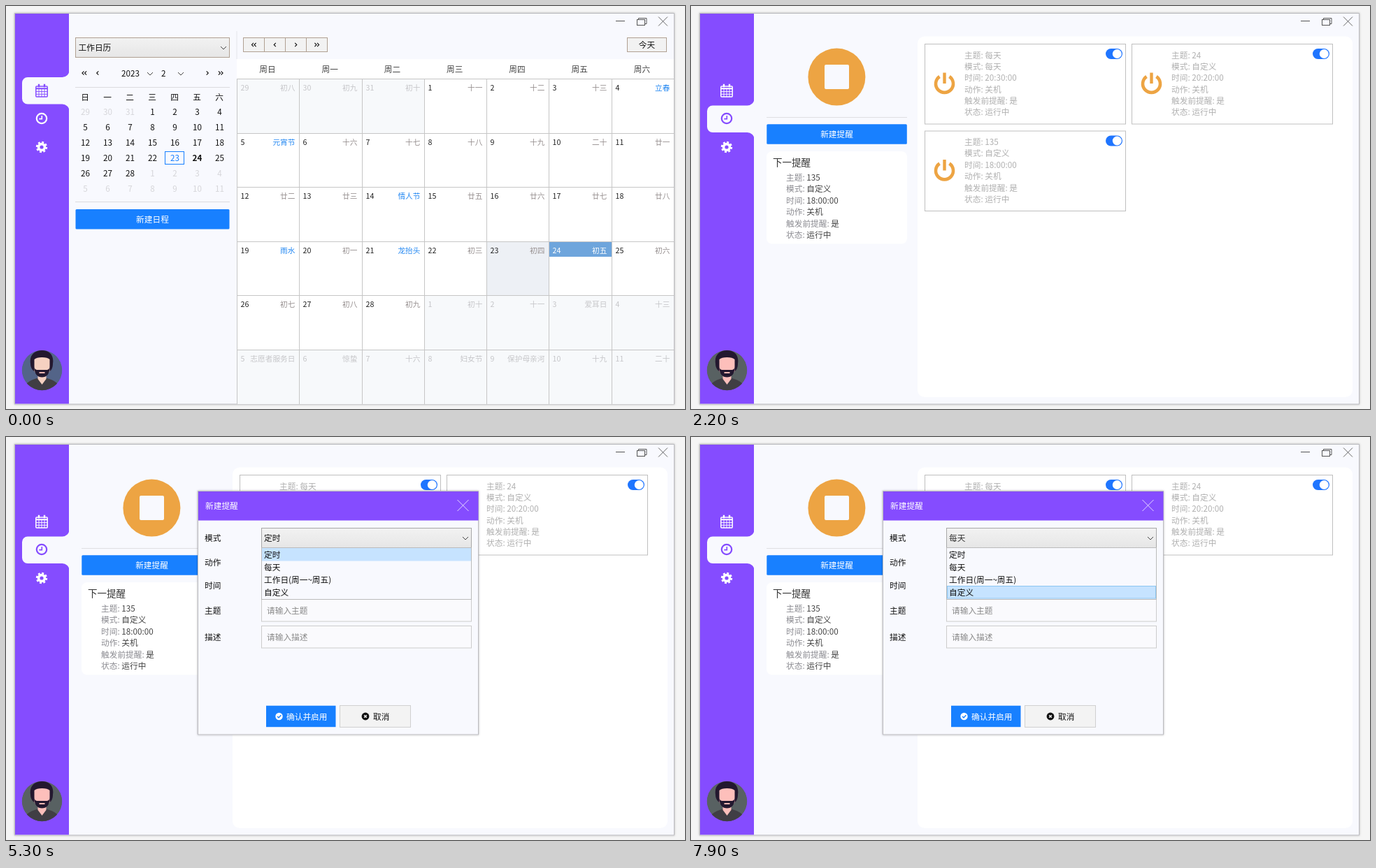
These frames come from a looping animation (971 px wide and 577 px high, 8 s). An HTML page:

```html
<!DOCTYPE html>
<html lang="zh-CN">
<head>
<meta charset="utf-8">
<title>日程与提醒</title>
<style>
html, body { margin: 0; width: 100%; height: 100%; overflow: hidden; background: #f5f5f5; }
svg { display: block; width: 971px; height: 577px; }
text { font-family: "Noto Sans CJK SC", "Noto Sans CJK", "Noto Sans", sans-serif; white-space: pre; }

/* Hard cuts on one shared 8 s clock */
.cut { animation: 8s step-end infinite; }
#calendar { animation-name: leave; }
#reminders { animation-name: enter; }
#dialog { animation-name: dialog; }
#timed { animation-name: timed; }
#daily { animation-name: daily; }
#popup { animation-name: popup; }
#hover { animation-name: hover; }
#close { animation-name: close; }
#back { animation-name: back; }
#skin { animation-name: skin; }

@keyframes leave { 0% { visibility: visible } 7.5%, 100% { visibility: hidden } }
@keyframes enter { 0% { visibility: hidden } 7.5%, 100% { visibility: visible } }
@keyframes dialog { 0% { visibility: hidden } 45%, 100% { visibility: visible } }
@keyframes timed { 0% { visibility: hidden } 45% { visibility: visible } 80%, 100% { visibility: hidden } }
@keyframes daily { 0% { visibility: hidden } 80%, 100% { visibility: visible } }
@keyframes popup {
  0% { visibility: hidden } 62.5% { visibility: visible }
  80% { visibility: hidden } 88.75%, 100% { visibility: visible }
}
@keyframes hover {
  0% { transform: none; stroke: #c6e3ff }
  75% { transform: translateY(18px); stroke: #8cc6f2 }
  93.75% { transform: translateY(36px); stroke: #8cc6f2 }
  97.5%, 100% { transform: translateY(54px); stroke: #8cc6f2 }
}
@keyframes close { 0% { opacity: .55 } 57.5%, 100% { opacity: .8 } }
@keyframes back { 0% { fill: #536488 } 7.5%, 100% { fill: #586162 } }
@keyframes skin { 0% { fill: #f6d1c1 } 7.5%, 100% { fill: #fdbfbb } }
</style>
</head>
<body>
<svg id="stage" viewBox="0 0 971 577"></svg>
<script>
const BG = '#f8f9fe', PURPLE = '#854cff', BLUE = '#1880ff', ORANGE = '#eda443';
const WEEK = [...'日一二三四五六'];

const rect = (x, y, w, h, fill, stroke = 'none', r = 0, more = '') =>
  `<rect x="${x}" y="${y}" width="${w}" height="${h}" rx="${r}" fill="${fill}" stroke="${stroke}" ${more}/>`;
const path = (d, stroke, width = 1, fill = 'none') =>
  `<path d="${d}" fill="${fill}" stroke="${stroke}" stroke-width="${width}"/>`;
const disc = (x, y, r, fill, more = '') => `<circle cx="${x}" cy="${y}" r="${r}" fill="${fill}" ${more}/>`;
const ring = (x, y, r, color, width, more = '') =>
  disc(x, y, r, 'none', `stroke="${color}" stroke-width="${width}" ${more}`);
// y is the vertical middle of the line
const text = (s, x, y, fill = '#111', anchor = 'start', size = 11.7, weight = 400) =>
  `<text x="${x}" y="${y + size * .37}" fill="${fill}" text-anchor="${anchor}" font-size="${size}" font-weight="${weight}">${s}</text>`;
const group = (id, body) => `<g id="${id}" class="cut">${body}</g>`;
const times = (n, f) => Array.from({ length: n }, (_, i) => f(i)).join('');

const down = (x, y, c = '#444') => path(`M${x - 4} ${y - 2}l4 4 4-4`, c);
const angle = (x, y, dir) => path(`M${x - 1.3 * dir} ${y - 2.6}l${2.6 * dir} 2.6 ${-2.6 * dir} 2.6`, '#111', 1.1);
const angles = (x, y, dir) => angle(x - 1.8, y, dir) + angle(x + 1.8, y, dir);
const cross = (x, y, r, c, w = 1) =>
  path(`M${x - r} ${y - r}l${2 * r} ${2 * r}M${x + r} ${y - r}l${-2 * r} ${2 * r}`, c, w);
const button = (x, y, w, h, s) => rect(x, y, w, h, BLUE, 'none', 1.5) + text(s, x + w / 2, y + h / 2, '#fff', 'middle');
const combo = (x, y, w, border = '#a8a8a8') =>
  rect(x, y, w, 28, 'url(#face)', border) + down(x + w - 8.5, y + 14.5);
const framed = (x, y, w, h) => `<g filter="url(#shadow)">${rect(x, y, w, h, BG, '#bcbcc0')}</g>`;

const calIcon = c => rect(42.8, 115, 16.4, 15, 'none', c, 1, 'stroke-width="1.5"')
  + path('M42.5 118.2h17', c, 2) + path('M43 122.5h16M43 126.3h16M47 119v11M51 119v11M55 119v11', c, .9)
  + path('M47 111.8v4.5M55 111.8v4.5', c, 2.4);
const clockIcon = c => ring(51, 161, 7.2, c, 2.2) + path('M51.3 157v4.6h-4', c, 1.6);
const gearIcon = ring(51, 202, 4.4, '#fff', 3.6) + ring(51, 202, 6.9, '#fff', 2.6, 'stroke-dasharray="2.9 2.52"');
const tab = y => path(`M90.5 ${y - 10}A10 10 0 0 1 80 ${y}H31a8 8 0 0 0-8 8v22.500a8 8 0 0 0 8 8h49A10 10 0 0 1 90.5 ${y + 48.5}z`, 'none', 0, BG);

function shell() {
  const hair = '#23182f';
  const avatar = `<g clip-path="url(#round)">`
    + disc(51.5, 521.5, 29, '#536488', 'id="back" class="cut"')
    + path('M24 552C25 541 34 536 44 533h15c10 3 19 8 20 19z', 'none', 0, '#403e44')
    + path('M35 512C33 500 41 493 51.500 493S69 500 67 512c0 6-2 9-4 11H40c-2-2-5-5-5-11z', 'none', 0, hair)
    + `<path id="skin" class="cut" d="M40.500 506q3-3 11-3t11 3v17l-5 6v5l-6 8-6-8v-5l-5-6z"/>`
    + path('M40 516C40.500 527 45 531.500 51.500 531.500S62.500 527 63 516C62 522 58 521 51.500 521S41 522 40 516z', 'none', 0, hair)
    + path('M47.500 525h8', '#f0b8b2', 1.8) + '</g>';
  return framed(12.5, 10.5, 943, 559.5)
    + rect(13, 11, 77, 558.5, PURPLE) + avatar + gearIcon
    + path('M872 21.5h13', '#555') + rect(902.5, 19.5, 11, 8, BG, '#555')
    + path('M904.500 19v-1.500h11.500v8h-2', '#555') + cross(939.5, 22, 6.5, '#666');
}

const lunar = ('初八 初九 初十 十一 十二 十三 立春 元宵节 十六 十七 十八 十九 二十 廿一 '
  + '廿二 廿三 情人节 廿五 廿六 廿七 廿八 雨水 初一 龙抬头 初三 初四 初五 初六 '
  + '初七 初八 初九 初十 十一 爱耳日 十三 志愿者服务日 惊蛰 十六 妇女节 保护母亲河 十九 二十').split(' ');
const FESTIVALS = ['立春', '元宵节', '情人节', '雨水', '龙抬头'];
const inMonth = i => i > 2 && i < 31;
const dayOf = i => i < 3 ? 29 + i : inMonth(i) ? i - 2 : i - 30;
const colX = i => Math.round(330.1 + i * 89.25);
const rowY = i => Math.round(104 + i * 77.6);

function miniDay(i) {
  const d = dayOf(i), x = 113 + i % 7 * 32, y = 152 + Math.floor(i / 7) * 22;
  const now = inMonth(i) && d === 23, next = inMonth(i) && d === 24;
  return (now ? rect(x - 13.5, y - 9.5, 27, 18, BG, BLUE) : '')
    + text(d, x + .5, y, now ? BLUE : inMonth(i) ? '#111' : '#d6d6da', 'middle', 11.7, next ? 700 : 400);
}

function cell(i) {
  const col = i % 7, row = Math.floor(i / 7), x = colX(col), y = rowY(row);
  const w = colX(col + 1) - x, h = rowY(row + 1) - y;
  const on = inMonth(i), d = dayOf(i), today = on && d === 24, name = lunar[i];
  const fill = !on ? '#f7f9fb' : d === 23 ? '#edf0f5' : '#fff';
  const color = today ? '#fff' : on ? '#222' : '#c6c6c9';
  const note = today || !on ? color : FESTIVALS.includes(name) ? '#2488f2' : '#968f8f';
  return rect(x, y, w, h, fill) + (today ? rect(x, y, w, 22, '#6ea5dc') : '')
    + text(d, x + 5.5, y + 13, color, 'start', 10.7) + text(name, x + 83.5, y + 13, note, 'end', 10.7);
}

function calendar() {
  const edge = '#b0a092';
  return tab(102) + calIcon(PURPLE) + clockIcon('#fff')
    + combo(99.5, 45.5, 220, edge) + text('工作日历', 103.5, 60)
    + angles(112, 96, -1) + angle(131, 96, -1) + text('2023', 165, 97) + down(206, 97)
    + text('2', 222, 97) + down(250, 97) + angle(288, 96, 1) + angles(307, 96, 1)
    + path('M99 116.5h221M99 280.500h221', '#dcdcdf')
    + times(7, i => text(WEEK[i], 113 + i * 32, 130.5, '#111', 'middle')) + times(42, miniDay)
    + button(99.5, 291, 220, 28.5, '新建日程')
    + path('M330 36v40', '#e4e4ea')
    + rect(339.5, 45.5, 120, 20, '#f2f2f2', edge) + path('M369.500 45v21M399.500 45v21M429.500 45v21', edge)
    + angles(354.5, 55.5, -1) + angle(384.5, 55.5, -1) + angle(414.5, 55.5, 1) + angles(444.5, 55.5, 1)
    + rect(888.5, 45.5, 56, 20, '#f2f2f2', edge) + text('今天', 916.5, 56, '#111', 'middle')
    + rect(330, 76, 625, 28, '#fff')
    + times(7, i => text('周' + WEEK[i], 374 + i * 89.25, 90.5, '#444', 'middle'))
    + times(42, cell)
    + times(6, i => path(`M330 ${rowY(i) + .5}h625`, '#c6c6c6'))
    + times(7, i => path(`M${colX(i) + .5} 104v466`, '#c6c6c6'));
}

const KEYS = ['主题', '模式', '时间', '动作', '触发前提醒', '状态'];
const details = (x, y, vals, key, val) => times(6, i =>
  text(`${KEYS[i]}: <tspan fill="${val}">${vals[i]}</tspan>`, x, y + i * 16.35, key));

function card(x, y, vals) {
  return rect(x + .5, y + .5, 287, 114.5, '#fff', '#bfbfbf')
    + path(`M${x + 21.5} ${y + 47}a12.500 12.500 0 1 0 14 0`, ORANGE, 4.6)
    + path(`M${x + 28.5} ${y + 41.5}v15.500`, ORANGE, 4.4)
    + details(x + 57, y + 16.3, vals, '#b0b0b0', '#b0b0b0')
    + rect(x + 259, y + 7, 24, 15, '#1f75ff', 'none', 7.5) + disc(x + 275.3, y + 14.5, 6.5, '#fff');
}

function reminders() {
  const job = (name, mode, at) => [name, mode, at, '关机', '是', '运行中'];
  const next = job('135', '自定义', '18:00:00');
  return tab(142.5) + calIcon('#fff') + clockIcon(PURPLE)
    + disc(208.4, 101.6, 41, ORANGE) + rect(191, 84, 35, 35, BG, 'none', 2)
    + path('M108 159.500h201', '#dfdfe3') + button(108.3, 169.3, 200.5, 28.5, '新建提醒')
    + rect(108, 208, 201, 132.5, '#fff', 'none', 8) + text('下一提醒', 117, 224, '#333', 'start', 13.5)
    + details(136, 245.8, next, '#8c8c92', '#444')
    + rect(324, 43.5, 622, 516.5, '#fff', 'none', 10)
    + card(334, 54, job('每天', '每天', '20:30:00'))
    + card(630, 54, job('24', '自定义', '20:20:00'))
    + card(334, 178.5, next);
}

function spinner(x, w, s) {
  const bx = x + w - 19;
  return rect(x, 199.5, w, 26, '#fff', '#757575') + text(s, x + 2.5, 213)
    + rect(bx, 201.5, 17, 10.5, '#f0f0f0', '#aaa') + rect(bx, 213, 17, 10.5, '#f0f0f0', '#aaa')
    + path(`M${bx + 5.5} 208.500l3-3.500 3 3.500zM${bx + 5.5} 216.500l3 3.500 3-3.500z`, 'none', 0, '#222');
}
const input = (y, s) => rect(365.5, y, 300, 31.5, '#fafafd', '#ccc') + text(s, 373, y + 16, '#888');

function dialog() {
  const labels = [['模式', 145], ['动作', 180], ['时间', 213], ['主题', 248.5], ['描述', 286.5]];
  const modes = ['定时', '每天', '工作日(周一~周五)', '自定义'];
  return framed(274.5, 77.5, 401, 348.5)
    + rect(275, 78, 400.5, 41.5, PURPLE) + text('新建提醒', 285, 98.7, '#fff')
    + group('close', cross(653.5, 98, 8, '#fff'))
    + labels.map(([s, y]) => text(s, 284, y)).join('')
    + combo(365.5, 130.5, 300) + combo(365.5, 165, 300) + text('提醒', 369, 180)
    + group('timed', text('定时', 369, 145) + spinner(365.5, 147, '2023-02-24') + spinner(518.5, 147, '17:27:25'))
    + group('daily', text('每天', 369, 145, '#333') + spinner(365.5, 300, '17:27:25'))
    + input(232.5, '请输入主题') + input(270.5, '请输入描述')
    + rect(372, 384.7, 99.5, 30.5, BLUE) + disc(390.5, 400, 5.2, '#fff') + path('M388 400l2 2 3.300-3.800', BLUE, 1.5)
    + text('确认并启用', 401, 400.2, '#fff')
    + rect(477.5, 384.5, 101, 31, '#f3f3f3', '#d0d0d0') + disc(514, 400, 5.4, '#111') + cross(514, 400, 1.8, '#fff', 1.5)
    + text('取消', 525, 400.2)
    + group('popup', rect(365.5, 158.5, 300, 74, BG, '#bbb')
      + rect(366.5, 159.5, 298, 17.5, '#c6e3ff', '#c6e3ff', 0, 'id="hover" class="cut"')
      + modes.map((s, i) => text(s, 369, 168.3 + i * 18.2)).join(''));
}

document.getElementById('stage').innerHTML = `<defs>
  <linearGradient id="face" x2="0" y2="1"><stop stop-color="#f2f2f2"/><stop offset="1" stop-color="#e6e6e6"/></linearGradient>
  <clipPath id="round">${disc(51.5, 521.5, 28.8, '#000')}</clipPath>
  <filter id="shadow" x="-5%" y="-5%" width="110%" height="110%">
    <feDropShadow dx="0" dy="0" stdDeviation="1.5" flood-color="#000" flood-opacity=".3"/>
  </filter></defs>`
  + shell() + group('calendar', calendar()) + group('reminders', reminders()) + group('dialog', dialog());
</script>
</body>
</html>
```
